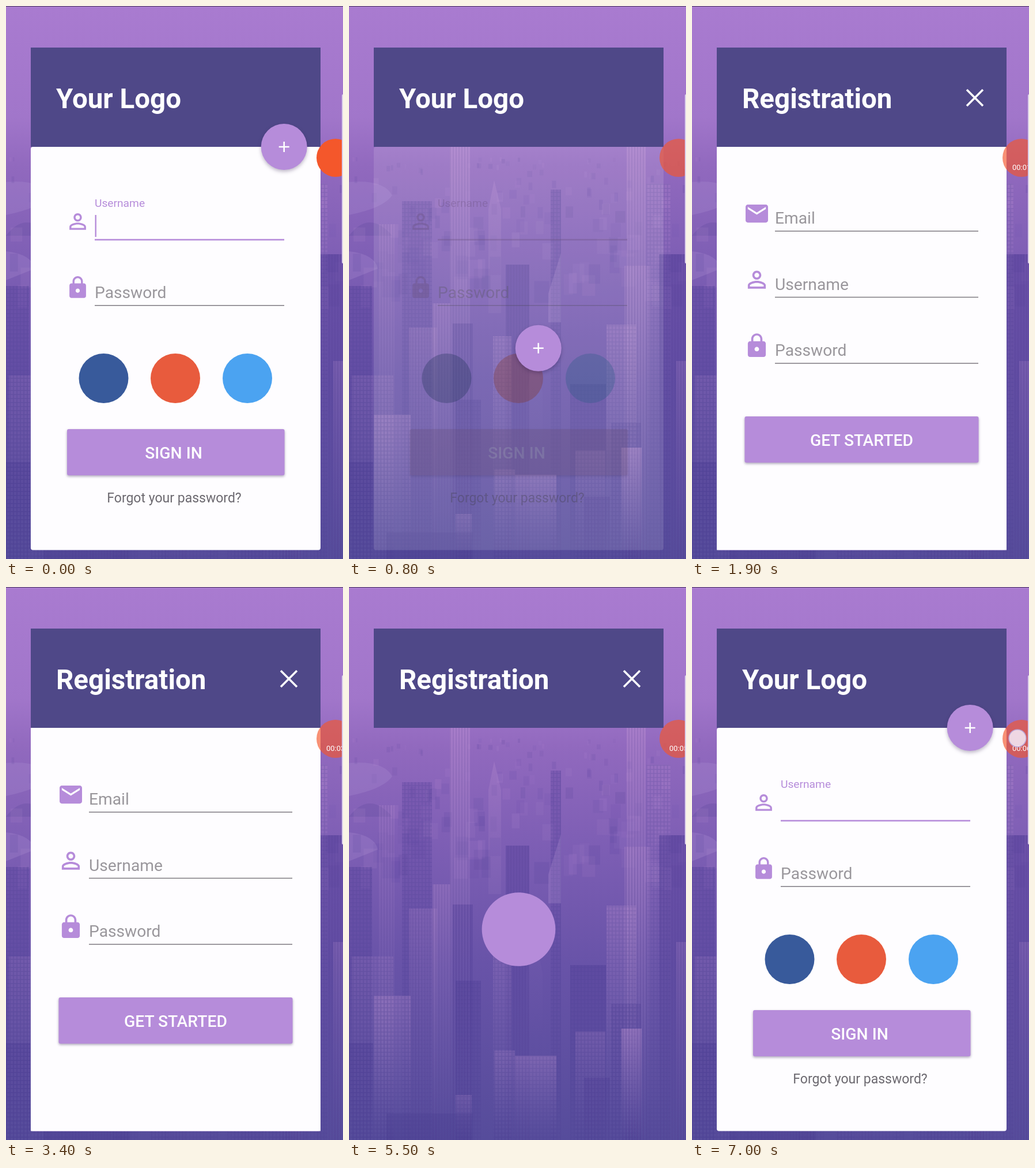
An HTML page that plays this animation: 585 px wide and 958 px high, repeating every 7.1 s.

```html
<!DOCTYPE html>
<html lang="en">
<head>
<meta charset="utf-8">
<style>
  html, body { margin: 0; width: 100%; height: 100%; overflow: hidden; }
  svg { display: block; width: 100vw; height: 100vh; font-family: Roboto, sans-serif; }
  .accent { fill: #b68cda; }
  .paper { fill: #fefdff; }
  .title { font-size: 47.5px; font-weight: 700; fill: #fff; }
  .hint { font-size: 28.2px; fill: #9a979c; }
  .label { font-size: 28.3px; font-weight: 500; fill: #fff; text-anchor: middle; }
  .rule { stroke: #7d7a80; stroke-width: 1.6; }
  .raised { filter: drop-shadow(0 2px 2px rgba(40, 20, 70, .38)); }
  .white-line { stroke: #fff; fill: none; }
</style>
</head>
<body>
<svg viewBox="0 0 585 958" preserveAspectRatio="none">
  <defs>
    <linearGradient id="sky" x2="0" y2="1">
      <stop stop-color="#a97bd0"/>
      <stop offset=".2" stop-color="#a176ca"/>
      <stop offset=".29" stop-color="#9169be"/>
      <stop offset=".45" stop-color="#7f5fb5"/>
      <stop offset=".68" stop-color="#6853a8"/>
      <stop offset="1" stop-color="#564c9b"/>
    </linearGradient>
    <linearGradient id="lit" x2="0" y2="1">
      <stop stop-color="#c79ad6"/><stop offset="1" stop-color="#8f7cc0" stop-opacity="0"/>
    </linearGradient>
    <linearGradient id="shade" x2="0" y2="1">
      <stop stop-color="#40308c"/><stop offset="1" stop-color="#40308c" stop-opacity="0"/>
    </linearGradient>
    <pattern id="panes" width="6" height="7" patternUnits="userSpaceOnUse">
      <path d="M0 1H6M1 0V7" stroke="#4a3a92" stroke-opacity=".22" stroke-width="1.5"/>
    </pattern>
    <pattern id="ribs" width="5" height="5" patternUnits="userSpaceOnUse">
      <path d="M1 0V5" stroke="#4a3a92" stroke-opacity=".2" stroke-width="1.5"/>
    </pattern>
    <clipPath id="iris"><circle id="irisCircle" cx="294.5" cy="593"/></clipPath>
    <path id="person" d="M12 5.9c1.16 0 2.1.94 2.1 2.1s-.94 2.1-2.1 2.1S9.9 9.16 9.9 8s.94-2.1 2.1-2.1m0 9c2.97 0 6.1 1.46 6.1 2.1v1.1H5.9V17c0-.64 3.13-2.1 6.1-2.1M12 4C9.79 4 8 5.79 8 8s1.79 4 4 4 4-1.79 4-4-1.79-4-4-4zm0 9c-2.67 0-8 1.34-8 4v3h16v-3c0-2.66-5.33-4-8-4z"/>
    <path id="lock" d="M18 8h-1V6c0-2.76-2.24-5-5-5S7 3.24 7 6v2H6c-1.1 0-2 .9-2 2v10c0 1.1.9 2 2 2h12c1.1 0 2-.9 2-2V10c0-1.1-.9-2-2-2zm-6 9c-1.1 0-2-.9-2-2s.9-2 2-2 2 .9 2 2-.9 2-2 2zm3.1-9H8.9V6c0-1.71 1.39-3.1 3.1-3.1s3.1 1.39 3.1 3.1v2z"/>
    <path id="mail" d="M20 4H4c-1.1 0-2 .9-2 2v12c0 1.1.9 2 2 2h16c1.1 0 2-.9 2-2V6c0-1.1-.9-2-2-2zm0 4l-8 5-8-5V6l8 5 8-5v2z"/>
    <rect id="body" x="43" y="244" width="503" height="698.5" rx="4"/>
  </defs>

  <rect width="585" height="958" fill="url(#sky)"/>
  <g id="city"></g>
  <rect width="585" height="1" fill="#4a3560"/>

  <rect x="43" y="72" width="503" height="172" fill="#4f4888"/>
  <text id="loginTitle" class="title" x="87" y="177">Your Logo</text>
  <g id="joinTitle">
    <text class="title" x="87" y="177">Registration</text>
    <path class="white-line" d="M477 145l28 28m0-28l-28 28" stroke-width="3.6"/>
  </g>

  <use id="loginCard" href="#body" class="paper"/>
  <g id="loginForm">
    <g class="accent">
      <use href="#person" transform="translate(102.9 351.8) scale(1.8)"/>
      <use href="#lock" transform="translate(102.9 466.2) scale(1.8)"/>
      <text x="154" y="348" font-size="19.2">Username</text>
      <rect id="caret" x="154.5" y="362" width="2.4" height="38"/>
      <rect x="154" y="403.6" width="329" height="2.6"/>
      <rect class="raised" x="106" y="733" width="377.5" height="80" rx="3"/>
    </g>
    <text class="hint" x="154" y="505.5">Password</text>
    <path class="rule" d="M154 518.7H483"/>
    <circle cx="169.5" cy="645" r="43" fill="#385a9b"/>
    <circle cx="294" cy="645" r="43" fill="#e85b3d"/>
    <circle cx="419" cy="645" r="43" fill="#4ba3f1"/>
    <text class="label" x="291" y="784">SIGN IN</text>
    <text x="292" y="860" font-size="23" fill="#6c6970" text-anchor="middle">Forgot your password?</text>
  </g>

  <use id="ghost" href="#body" class="paper"/>
  <g id="fab">
    <circle class="accent" r="40" style="filter:drop-shadow(0 3px 3px rgba(40,20,70,.3))"/>
    <path class="white-line" d="M-9 0H9M0-9V9" stroke-width="2.6"/>
  </g>

  <g id="reveal" clip-path="url(#iris)">
    <use href="#body" class="accent"/>
    <g id="joinForm">
      <rect class="paper" x="43" y="244" width="503" height="698.5"/>
      <g class="accent">
        <use href="#mail" transform="translate(89.1 336.2) scale(1.95)"/>
        <use href="#person" transform="translate(89.1 450.7) scale(1.95)"/>
        <use href="#lock" transform="translate(89.1 565.2) scale(1.95)"/>
        <rect class="raised" x="91.5" y="711" width="406" height="80" rx="3"/>
      </g>
      <g class="hint">
        <text x="144" y="377">Email</text>
        <text x="144" y="491.5">Username</text>
        <text x="144" y="606">Password</text>
      </g>
      <path class="rule" d="M144 390H497M144 504.5H497M144 619H497"/>
      <text class="label" x="294.5" y="762">GET STARTED</text>
    </g>
  </g>

  <circle id="recorder" cx="572" cy="263" r="33" fill="#f4572b"/>
  <text id="timer" x="556" y="284" font-size="13" fill="#fff"></text>
  <circle id="touch" cx="565" cy="262" r="15" fill="#f3ecfa" fill-opacity=".85" stroke="#b9a4d4" stroke-width="1.5"/>
  <rect x="583" y="153" width="4" height="293" rx="2" fill="#dccfea"/>
</svg>

<script>
const LOOP = 7100;
const el = id => document.getElementById(id);
const seg = (t, a, b) => Math.min(1, Math.max(0, (t - a) / (b - a)));
const smooth = x => x * x * (3 - 2 * x);
const swing = x => (1 - Math.cos(Math.PI * x)) / 2;
const fade = (id, a) => { el(id).style.opacity = a; };

function buildCity() {
  let seed = 11;
  const rnd = () => (seed = seed * 16807 % 2147483647) / 2147483647;
  const tower = (x, y, w, tone, h = 958 - y) => {
    const box = `<rect x="${x}" y="${y}" width="${w}" height="${h}" `;
    return box + `fill="url(#${tone > 0 ? 'lit' : 'shade'})" opacity="${Math.abs(tone)}"/>` +
      box + `fill="url(#${w % 2 ? 'ribs' : 'panes'})"/>`;
  };
  let out = '<path d="M0 305Q60 300 75 328Q60 350 0 362ZM0 425Q45 430 50 455L0 475Z" fill="#a98ad0" opacity=".3"/>' +
    '<path d="M0 398Q35 352 75 398Z" fill="#5a4598" opacity=".25"/>';
  for (let i = 0; i < 150; i++) {
    const y = 262 + 230 * rnd() ** 1.4, size = 3 + (y - 255) / 14;
    out += `<rect x="${rnd() * 585}" y="${y}" width="${size * (.7 + rnd())}" height="${size * 2}" ` +
      `fill="${rnd() < .45 ? '#b68cd0' : '#4b3b94'}" opacity="${.05 + rnd() * .1}"/>`;
  }
  // x, top, width, light (+) or dark (-)
  const towers = [
    [175, 244, 35, .34], [482, 244, 33, .34], [516, 308, 42, .16], [350, 318, 18, -.22],
    [92, 338, 52, -.2], [52, 378, 27, .18], [538, 430, 47, -.35], [272, 448, 41, -.3],
    [478, 450, 45, .22], [0, 485, 40, -.25], [145, 515, 31, .25], [180, 550, 35, -.25],
    [104, 557, 49, .2], [447, 552, 52, .28], [250, 572, 32, .25], [568, 615, 17, .2],
    [5, 640, 72, .16], [384, 655, 62, -.25], [185, 682, 44, -.2], [43, 708, 64, .28],
    [455, 722, 52, -.15], [473, 765, 35, .4], [393, 770, 52, .2], [0, 790, 42, -.2],
    [252, 803, 36, .2], [288, 812, 72, .3], [408, 850, 45, -.2], [185, 880, 28, .2]
  ];
  out += towers.map(b => tower(...b)).join('');
  out += '<path d="M252 302l12 50v180h-22V352Z M323 600l13 70v110h-28V670Z" fill="url(#lit)" opacity=".22"/>' +
    '<path d="M368 428v120h-22v-50Z" fill="#c0a0dc" opacity=".22"/>' +
    '<rect x="65" y="912" width="150" height="46" fill="#443a8c" opacity=".25"/>';
  el('city').innerHTML = out;
}

// Normalised quadratic arc from 0 to 1 with one control value
const arc = (p, c) => 2 * p * (1 - p) * c + p * p;

function fabPosition(t) {
  const away = { x: 294.5, y: 593 }, home = { x: 482.7, y: 244 };
  const out = t < 3000;
  const p = smooth(out ? seg(t, 440, 888) : seg(t, 5650, 6110));
  const [from, to, cx, cy] = out ? [home, away, .03, 1.05] : [away, home, .6, .215];
  return [from.x + (to.x - from.x) * arc(p, cx), from.y + (to.y - from.y) * arc(p, cy)];
}

function draw(t) {
  const gone = t < 3000 ? seg(t, 450, 850) : 1 - seg(t, 5850, 6150);
  fade('loginCard', 1 - gone);
  fade('loginForm', 1 - gone ** 3);
  el('loginForm').style.filter = gone ? `brightness(${1 - gone / 2})` : 'none';
  fade('caret', t < 500 ? 1 : 0);

  const title = seg(t, 1300, 1600) - seg(t, 5850, 6100);
  fade('joinTitle', title);
  fade('loginTitle', 1 - title);

  el('fab').setAttribute('transform', `translate(${fabPosition(t)})`);

  const open = swing(seg(t, 890, 1390)) - swing(seg(t, 5062, 5562));
  el('irisCircle').setAttribute('r', 40 + 658 * open);
  el('reveal').style.display = t > 890 && t < 5562 ? '' : 'none';
  fade('joinForm', seg(t, 1300, 1600) - seg(t, 5280, 5480));
  fade('ghost', t < 2000 ? 0 : .92 * (1 - seg(t, 5300, 5420)));

  fade('recorder', 1 - .35 * seg(t, 300, 700));
  el('timer').textContent = t < 1400 ? '' : '00:0' + Math.floor((t - 400) / 1000);
  fade('touch', t >= 6900 ? 1 : 0);
}

buildCity();
const start = performance.now();
(function tick() {
  draw((performance.now() - start) % LOOP);
  requestAnimationFrame(tick);
})();
</script>
</body>
</html>
```
